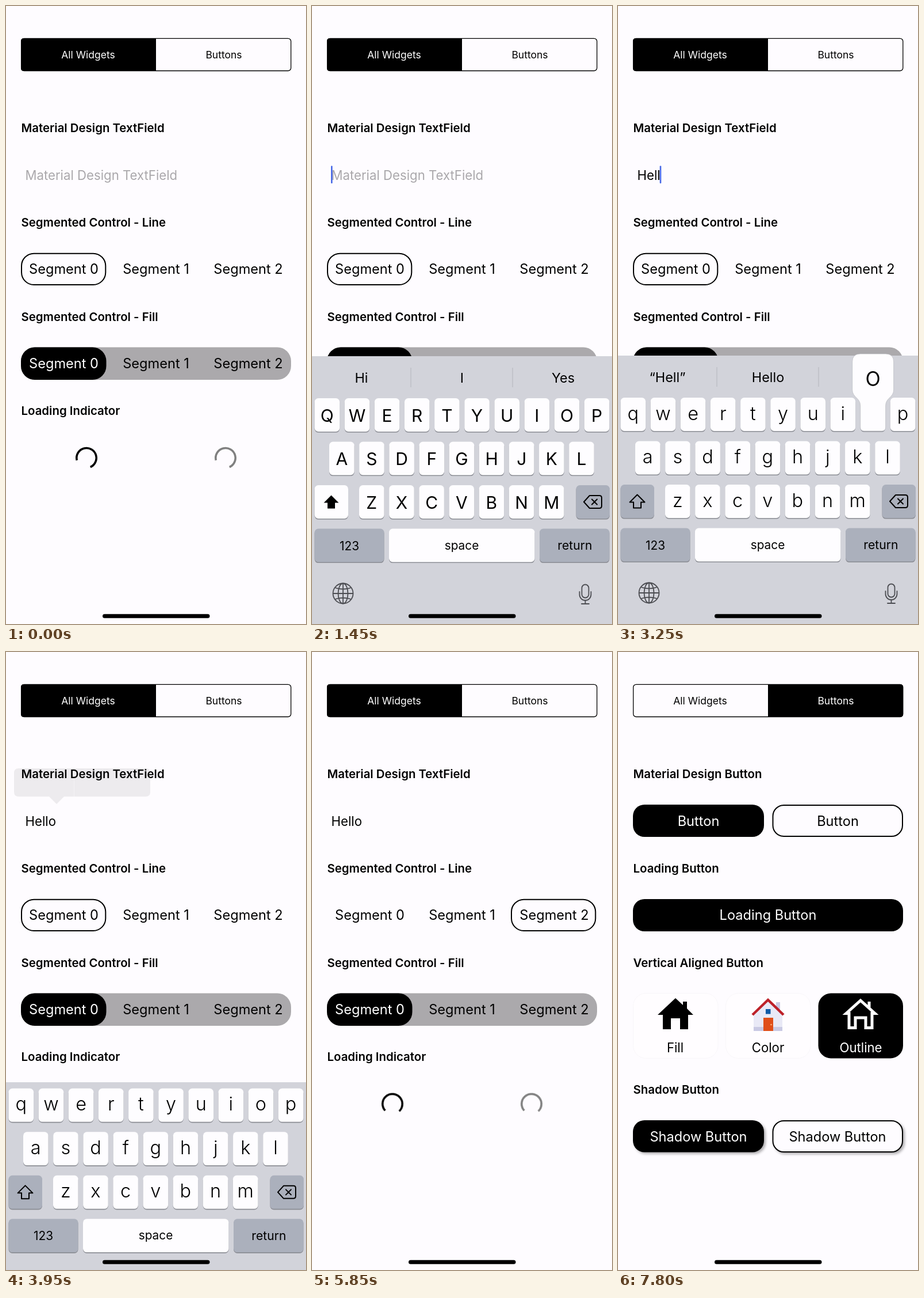
These frames come from a looping animation (522 by 1073 pixels, 8000 ms). An HTML page:

```html
<!DOCTYPE html>
<html lang="en">
<head>
<meta charset="utf-8">
<title>Widgets demo</title>
<style>
html, body { margin: 0; width: 100%; height: 100%; overflow: hidden; background: #fefcff; }
svg { display: block; width: 522px; height: 1073px; font-family: Inter, "Liberation Sans", sans-serif; }
.run, .ripple, .ripple circle { animation: 8s linear infinite; }

.page1 { animation-name: leave; }
.page2 { animation-name: enter; }
@keyframes leave { 0%, 93.74% { opacity: 1 } 93.75%, 100% { opacity: 0 } }
@keyframes enter { 0%, 93.74% { opacity: 0 } 93.75%, 100% { opacity: 1 } }

.tab1 { animation-name: tabOff; }
.tab2 { animation-name: tabOn; }
@keyframes tabOff { 0%, 93.1% { opacity: 1 } 95%, 100% { opacity: 0 } }
@keyframes tabOn { 0%, 93.1% { opacity: 0 } 95%, 100% { opacity: 1 } }
.label1 { animation-name: toBlack; }
.label2 { animation-name: toWhite; }
@keyframes toBlack { 0%, 93.1% { fill: #fff } 95%, 100% { fill: #000 } }
@keyframes toWhite { 0%, 93.1% { fill: #000 } 95%, 100% { fill: #fff } }

.ripple { opacity: 0; animation-name: glow; animation-delay: var(--t); }
.ripple circle { transform-box: fill-box; transform-origin: center; animation-name: grow; animation-delay: var(--t); }
@keyframes glow { 0% { opacity: 0 } 1% { opacity: .9 } 3%, 4.2% { opacity: 1 } 7.6%, 100% { opacity: 0 } }
@keyframes grow { 0% { transform: scale(.05) } 3.125% { transform: scale(.43) } 6.5%, 100% { transform: scale(1.2) } }

.line { animation-name: slideLine; }
@keyframes slideLine {
  0%, 58.53% { transform: none; animation-timing-function: ease-in-out }
  61.34%, 65.7% { transform: translateX(160.5px); animation-timing-function: ease-in-out }
  68.5%, 100% { transform: translateX(320px) }
}
.fill { animation-name: slideFill; }
@keyframes slideFill {
  0%, 76.6% { transform: none; animation-timing-function: ease-in-out }
  79.4%, 83.5% { transform: translateX(160.5px); animation-timing-function: ease-in-out }
  86.3%, 100% { transform: translateX(321.5px) }
}
.seg0 { animation-name: seg0; }
.seg1 { animation-name: seg1; }
.seg2 { animation-name: seg2; }
@keyframes seg0 { 0%, 77.5% { fill: #fff } 78.5%, 100% { fill: #000 } }
@keyframes seg1 { 0%, 77.5% { fill: #000 } 78.5%, 84.4% { fill: #fff } 85.4%, 100% { fill: #000 } }
@keyframes seg2 { 0%, 84.4% { fill: #000 } 85.4%, 100% { fill: #fff } }

.keyboard { animation-name: keyboard; }
@keyframes keyboard {
  0%, 11.25% { transform: translateY(468px); animation-timing-function: cubic-bezier(.38, .7, .125, 1) }
  16.25%, 48.99% { transform: none; animation-timing-function: cubic-bezier(.38, .7, .125, 1) }
  53.8%, 100% { transform: translateY(468px) }
}
.bar { animation-name: bar; }
@keyframes bar { 0%, 48.74% { opacity: 1 } 48.75%, 100% { opacity: 0 } }
.caret { animation-name: caret; }
@keyframes caret {
  0%, 12.4% { opacity: 0 } 12.5%, 19.4% { opacity: 1 } 21.25%, 23% { opacity: 0 }
  23.1%, 48.7% { opacity: 1 } 48.75%, 100% { opacity: 0 }
}
.callout { animation-name: callout; }
.items { animation-name: items; }
@keyframes callout { 0%, 43.6% { opacity: 0 } 45.5%, 48.5% { opacity: 1 } 49.46%, 100% { opacity: 0 } }
@keyframes items { 0%, 48.5% { opacity: 1 } 49.2%, 100% { opacity: 0 } }
</style>
</head>
<body>
<svg id="stage" viewBox="0 0 522 1073"></svg>
<script>
const LOOP = 8000;

// Text whose capitals are centred on cy
const text = (x, cy, str, size, attrs = '') =>
  `<text x="${x}" y="${cy + size * 0.364}" font-size="${size}" ${attrs}>${str}</text>`;
const mid = (x, cy, str, size, attrs = '') => text(x, cy, str, size, 'text-anchor="middle" ' + attrs);
const heading = (cy, str) => text(26.5, cy, str, 20.4, 'font-weight="600"');
const box = (x, y, w, h, rx, attrs = '') =>
  `<rect x="${x}" y="${y}" width="${w}" height="${h}" rx="${rx}" ${attrs}/>`;
const OUTLINE = 'fill="#fefcff" stroke="#000" stroke-width="2"';

let clips = 0;
function ripple(x, y, w, h, rx, cx, cy, start, scale = 1) {
  const id = 'clip' + clips++;
  return `<clipPath id="${id}">${box(x, y, w, h, rx)}</clipPath>
    <g class="ripple" clip-path="url(#${id})" style="--t:${start}ms">
      ${box(x, y, w, h, rx, 'fill="#aba9ac"')}
      <circle cx="${cx}" cy="${cy}" r="${100 * scale}" fill="#757476"/></g>`;
}

const segX = [100.5, 261, 421.5];
const segments = (cy, cls) =>
  segX.map((x, i) => mid(x, cy, 'Segment ' + i, 23.6, cls ? `class="run seg${i}"` : '')).join('');
const spinner = (cx, color) =>
  `<g transform="translate(${cx} 784.7)"><circle class="spin" r="17.2" pathLength="360"
    fill="none" stroke="${color}" stroke-width="3.6"/></g>`;

const tabs = `
  ${box(26.6, 56.3, 469.2, 56.2, 5, 'fill="none" stroke="#000" stroke-width="1.3"')}
  <path class="run tab1" d="M261 56V113H31q-5 0-5-5V61q0-5 5-5Z"/>
  <path class="run tab2" d="M261 56V113H491q5 0 5-5V61q0-5-5-5Z"/>
  ${mid(143, 85, 'All Widgets', 17.5, 'class="run label1"')}
  ${mid(379, 85, 'Buttons', 17.5, 'class="run label2"')}`;

const page1 = `<g class="run page1">
  ${heading(211.5, 'Material Design TextField')}
  ${ripple(26, 265, 470, 56, 8, 200, 293, 480, 2.4)}
  ${text(33.5, 293.5, '', 22.2, 'id="field"')}
  <rect class="run caret" id="caret" y="277.5" width="2.6" height="30.5" rx="1" fill="#4768e6"/>
  ${heading(375.5, 'Segmented Control - Line')}
  ${ripple(189, 429, 143, 56, 22, 253, 473, 4600)}
  ${ripple(349, 429, 145, 56, 22, 425, 470, 5200)}
  ${box(27, 429.7, 146.3, 54.2, 21.5, 'class="run line" fill="none" stroke="#000" stroke-width="2"')}
  ${segments(456.5, false)}
  ${heading(539.5, 'Segmented Control - Fill')}
  ${box(26, 592.5, 470, 56.5, 24, 'fill="#aba9ac"')}
  ${ripple(189, 592.5, 143, 56.5, 22, 258, 622, 6050)}
  ${ripple(349, 592.5, 147, 56.5, 22, 420, 624, 6600)}
  ${box(26, 592.5, 148.5, 56.5, 24, 'class="run fill"')}
  ${segments(620.5, true)}
  ${heading(703, 'Loading Indicator')}
  ${spinner(140, '#000')}${spinner(382, '#808080')}
  <g class="run callout">
    <path fill="#222" d="M22 202H243q8 0 8 8V243q0 8-8 8H101L88 264 75 251H22q-8 0-8-8V210q0-8 8-8Z"/>
    <path stroke="#777" d="M118.5 202V251"/>
    <g class="run items" fill="#fff">${mid(66, 227, 'Select', 18.8)}${mid(185, 227, 'Select All', 18.8)}</g>
  </g></g>`;

const card = x => box(x, 592.5, 147.5, 113, 22, 'fill="#fffdff" stroke="#f8f6f9"');
const page2 = `<g class="run page2">
  ${heading(211.5, 'Material Design Button')}
  ${box(26, 265, 228, 56, 20)}${mid(140, 293.5, 'Button', 23.6, 'fill="#fff"')}
  ${box(269.5, 266, 225.5, 54, 19, OUTLINE)}${mid(382.5, 293.5, 'Button', 23.6)}
  ${heading(375.5, 'Loading Button')}
  ${box(26, 429, 470, 56, 20)}${mid(261, 456.5, 'Loading Button', 23.6, 'fill="#fff"')}
  ${heading(539.5, 'Vertical Aligned Button')}
  ${card(26.5)}${card(187.5)}${box(348.5, 592.5, 147.5, 113, 22)}
  <path d="M100 601 113 613V607H120V619L131 630H122V655H108V636H92V655H78V630H69Z"/>
  <path fill="#c9c9e3" d="M275 608H282V626L275 620Z"/>
  <path fill="#e9e9f6" d="M261 606 286 631V658H236V631Z"/>
  <path fill="#c9c9e3" d="M236 651H286V658H236Z"/>
  <path fill="none" stroke="#bd2129" stroke-width="4.5" d="M234 630 261 604 288 630"/>
  <path fill="#0f5aa6" d="M257 620H265.5V628.5H257Z"/>
  <path fill="#e04e18" d="M253 635H270V658H253Z"/>
  <circle cx="266.5" cy="647" r="1.3" fill="#ffb27a"/>
  <path fill="none" stroke="#fff" stroke-width="5" d="M398 627.5H402V652.5H413V635H431V652.5H442V627.5H447L422 605 397 627.5ZM437 617V607"/>
  ${mid(99.5, 687, 'Fill', 22.2)}${mid(261, 687, 'Color', 22.2)}${mid(422.5, 687, 'Outline', 22.2, 'fill="#fff"')}
  ${heading(760, 'Shadow Button')}
  <g style="filter:drop-shadow(3px 3px 2px rgba(0,0,0,.3))">
    ${box(26, 813, 228, 55.5, 20)}${box(269.5, 814, 225.5, 54, 19, OUTLINE)}</g>
  ${mid(140, 841.5, 'Shadow Button', 23.6, 'fill="#fff"')}${mid(382, 841.5, 'Shadow Button', 23.6)}
  </g>`;

const WHITE = '#fefdff', DARK = '#abb0bc';
const key = (x, y, w, fill = WHITE) =>
  box(x, y + 1.6, w, 58, 6.5, 'fill="#8b8d94"') + box(x, y, w, 58, 6.5, `fill="${fill}"`);
const rows = [['QWERTYUIOP', 4.5, 681], ['ASDFGHJKL', 30, 756.5], ['ZXCVBNM', 82, 832]];
const keyPos = {};
let caps = '', small = '', keys = '';
for (const [letters, x0, y] of rows) {
  [...letters].forEach((c, i) => {
    const x = x0 + 52.15 * i;
    keyPos[c] = [x, y];
    keys += key(x, y, 43.6);
    const label = (s, size, dy, weight) =>
      `<text x="${x + 21.8}" y="${y + dy}" font-size="${size}" font-weight="${weight}" text-anchor="middle">${s}</text>`;
    caps += label(c, 30, 40.5, 400);
    small += label(c.toLowerCase(), 32.5, 38.5, 300);
  });
}
const ARROW = 'M33.5 849.5 46.5 862.5H40V872.5H27V862.5H20.5Z';
const keyboard = `<g class="run keyboard"><g id="board">
  <g class="run bar">
    ${box(0, 608, 522, 63, 0, 'fill="#d2d3da"')}
    <path stroke="#bbbcc4" stroke-width="1.3" d="M172 628V662M349 628V662"/>
    ${[86, 261, 437].map(x => mid(x, 645, '', 23.4, 'class="hint"')).join('')}
  </g>
  ${box(0, 670, 522, 410, 0, 'fill="#d2d3da"')}
  ${keys}
  <g id="caps">${caps}${key(4.5, 832, 58.5)}<path d="${ARROW}"/></g>
  <g id="small">${small}${key(4.5, 832, 58.5, DARK)}
    <path d="${ARROW}" fill="none" stroke="#000" stroke-width="2" stroke-linejoin="round"/></g>
  ${key(459.5, 832, 58.5, DARK)}
  <path fill="none" stroke="#000" stroke-width="2" stroke-linejoin="round" stroke-linecap="round"
    d="M483 850H500q4 0 4 4V868q0 4-4 4H483L473 861ZM487 856.5 496 865.5M496 856.5 487 865.5"/>
  ${key(4.5, 907.5, 121, DARK)}${mid(65, 937, '123', 20.8)}
  ${key(134, 907.5, 253.5)}${mid(260.5, 936, 'space', 20.8)}
  ${key(396, 907.5, 121.5, DARK)}${mid(457.5, 936, 'return', 21.2)}
  <g fill="none" stroke="#4c4d52" stroke-width="1.8">
    <circle cx="54" cy="1020" r="17.5"/><ellipse cx="54" cy="1020" rx="8.5" ry="17.5"/>
    <path d="M54 1002.5V1037.5M36.5 1020H71.5M40 1010Q54 1015 68 1010M40 1030Q54 1025 68 1030"/>
    <rect x="469.5" y="1004.5" width="12" height="23" rx="6"/>
    <path stroke-linecap="round" d="M465.5 1017V1022a10 10 0 0 0 20 0V1017M475.5 1032V1038M469 1038H482"/>
  </g>
  <g id="popup"><path fill="${WHITE}" stroke="#b9bac0" stroke-width=".7"
    d="M7 58H37q7 0 7-7V14c0-14 14-14 14-28V-62q0-14-14-14H0q-14 0-14 14v48c0 14 14 14 14 28V51q0 7 7 7Z"/>
    ${mid(22, -38, '', 46, 'font-weight="300"')}</g>
  </g></g>`;

const $ = id => document.getElementById(id);
const stage = $('stage');
stage.innerHTML = tabs + page1 + page2 + keyboard + box(168, 1055.7, 186.5, 7, 3.5);

const WORD = 'Hello';
const typedAt = [1880, 2300, 2740, 2990, 3300];
const hints = [
  ['Hi', 'I', 'Yes'], ['“H”', 'Hey', 'He'], ['“He”', 'Hey', 'Here'],
  ['“Hel”', 'Hello', 'Help'], ['“Hell”', 'Hello', 'Hells'], ['“Hello”', 'Hello', 'Hellos']
];
const show = (el, on) => el.setAttribute('display', on ? 'inline' : 'none');
const field = $('field'), popup = $('popup');
const hintEls = stage.querySelectorAll('.hint'), spins = stage.querySelectorAll('.spin');
let count = -1;

function type(t) {
  const n = typedAt.filter(at => at <= t).length;
  if (n !== count) {
    count = n;
    field.textContent = n ? WORD.slice(0, n) : 'Material Design TextField';
    field.setAttribute('fill', n ? '#000' : '#aaa8ab');
    $('caret').setAttribute('x', n ? 32.5 + field.getComputedTextLength() : 33);
    hintEls.forEach((el, i) => el.textContent = hints[n][i]);
    show($('caps'), !n);
    show($('small'), n);
    $('board').setAttribute('transform', `translate(0 ${n ? -1 : 0})`);
  }
  const down = typedAt.findIndex(at => t >= at - 80 && t < at + 40);
  show(popup, down >= 0);
  if (down >= 0) {
    popup.setAttribute('transform', `translate(${keyPos[WORD[down].toUpperCase()]})`);
    popup.lastElementChild.textContent = WORD[down];
  }
}

const ease = u => u * u * (3 - 2 * u);

// Arc grows for 1 s, collapses for 0.5 s, and turns once every 4 s
function spin(t) {
  const s = 0.885 + t * 0.001305, u = s % 1.5;
  const head = u < 1 ? 360 * ease(u) : 360;
  const tail = u < 1 ? 90 * ease(u) : 90 + 270 * ease(2 * u - 2);
  for (const el of spins) {
    el.setAttribute('stroke-dasharray', `${head - tail} 360`);
    el.setAttribute('transform', `rotate(${90 * s + tail})`);
  }
}

let start;
function frame(now) {
  start ??= now;
  const t = (now - start) % LOOP;
  type(t);
  spin(t);
  requestAnimationFrame(frame);
}
type(0);
spin(0);
requestAnimationFrame(frame);
</script>
</body>
</html>
```
